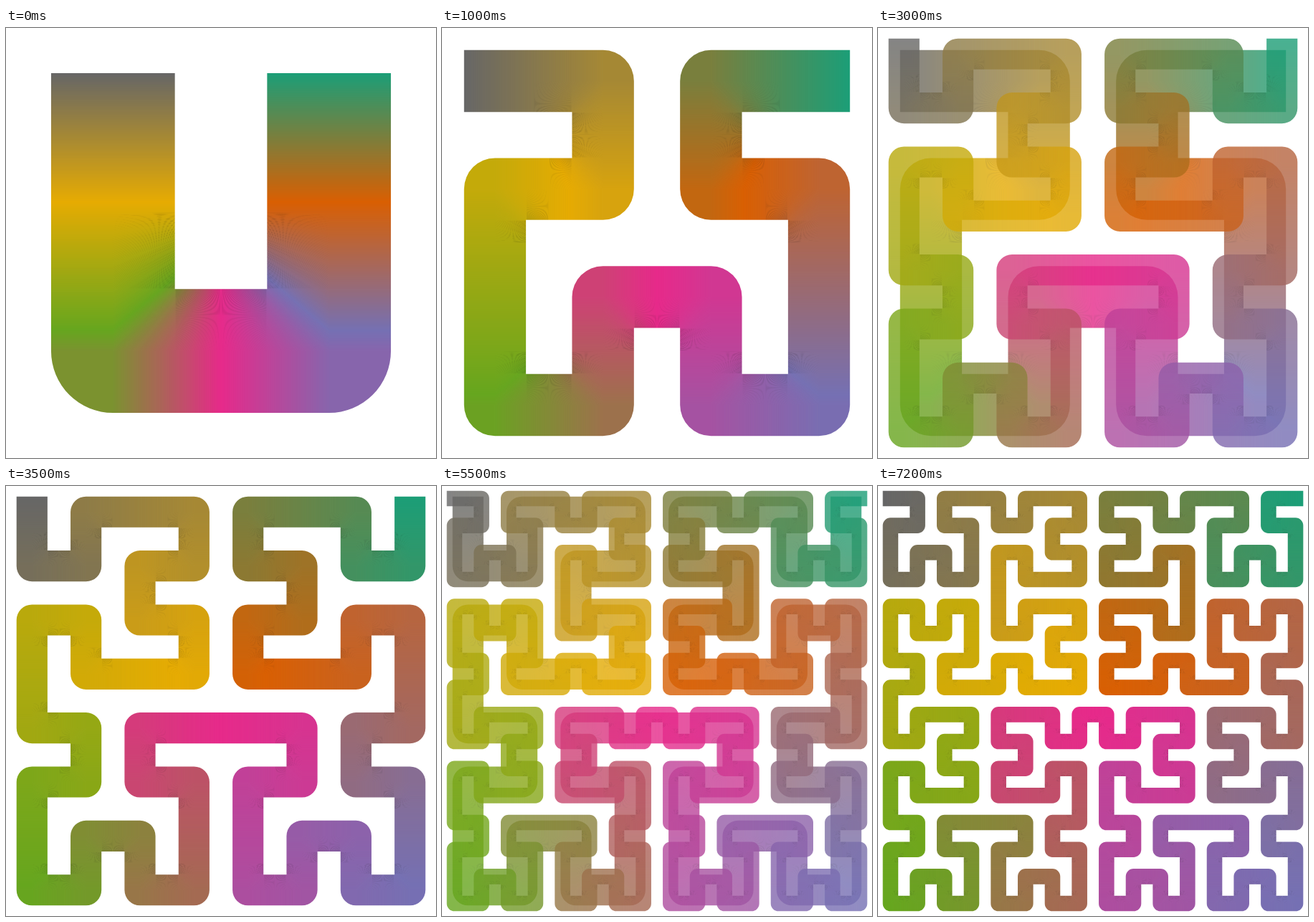
These frames come from a looping animation (600 by 600 pixels, 8000 ms). An HTML page with a canvas:

```html
<!DOCTYPE html>
<html lang="en">
<head>
<meta charset="utf-8">
<title>Hilbert curves</title>
<style>
  html, body { margin: 0; width: 100%; height: 100%; overflow: hidden; background: #fff; }
  canvas { display: block; width: 600px; height: 600px; }
</style>
</head>
<body>
<canvas id="stage" width="600" height="600"></canvas>
<script>
const SIZE = 600;
const SPAN = 602.8;      // side of the square the curve fills
const THICKNESS = 0.573; // line width relative to point spacing
const BLEND = 0.8;
const LOOP = 8000;
const STOPS = [
  [27, 158, 119], [217, 95, 2], [117, 112, 179], [231, 41, 138],
  [102, 166, 30], [230, 171, 2], [102, 102, 102]
];
// Start time and the curve orders visible from then on.
const STEPS = [
  [0, [1]], [500, [1, 2]], [1000, [2]], [3000, [2, 3]],
  [3500, [3]], [5500, [3, 4]], [6000, [4]]
];

function hilbert(x, y, ax, ay, bx, by, n, out = []) {
  if (n === 0) {
    out.push([x + (ax + bx) / 2, y + (ay + by) / 2]);
    return out;
  }
  const hax = ax / 2, hay = ay / 2, hbx = bx / 2, hby = by / 2;
  hilbert(x, y, hbx, hby, hax, hay, n - 1, out);
  hilbert(x + hax, y + hay, hax, hay, hbx, hby, n - 1, out);
  hilbert(x + hax + hbx, y + hay + hby, hax, hay, hbx, hby, n - 1, out);
  hilbert(x + hax + bx, y + hay + by, -hbx, -hby, -hax, -hay, n - 1, out);
  return out;
}

function colorAt(t) {
  const p = Math.min(Math.max(t, 0), 1) * (STOPS.length - 1);
  const i = Math.min(Math.floor(p), STOPS.length - 2);
  const rgb = STOPS[i].map((c, k) => Math.round(c + (STOPS[i + 1][k] - c) * (p - i)));
  return `rgb(${rgb})`;
}

function direction(a, b) {
  const dx = b[0] - a[0], dy = b[1] - a[1], len = Math.hypot(dx, dy);
  return { x: dx / len, y: dy / len, len };
}

function tracePolygon(ctx, pts) {
  ctx.beginPath();
  pts.forEach(([x, y]) => ctx.lineTo(x, y));
}

// Paints color bands from vertex v halfway along d; bands lean into the inner corner.
function paintHalf(ctx, v, d, n, turning, edge, colorOf) {
  const half = d.len / 2;
  const count = Math.ceil(half / 1.5);
  const row = u => {
    const inner = turning && u < half ? edge + u * (half - edge) / half : u;
    const at = (along, side) => [
      v[0] + d.x * along + n.x * side,
      v[1] + d.y * along + n.y * side
    ];
    return [at(u, -edge), at(u, 0), at(inner, edge)];
  };
  for (let i = 0; i < count; i++) {
    const from = half * i / count, to = half * (i + 1) / count;
    tracePolygon(ctx, [...row(from), ...row(to + 0.8).reverse()]);
    ctx.fillStyle = colorOf((from + to) / 2);
    ctx.fill();
  }
}

function makeCurve(order) {
  const canvas = document.createElement("canvas");
  canvas.width = canvas.height = SIZE;
  const ctx = canvas.getContext("2d");
  const low = (SIZE - SPAN) / 2;
  const pts = hilbert(low + SPAN, low, 0, SPAN, -SPAN, 0, order);
  const last = pts.length - 1;
  const width = SPAN / 2 ** order * THICKNESS;
  const edge = width / 2 + 1;

  // Lengthen both ends so the gradient also covers the square caps.
  for (const [end, next] of [[0, 1], [last, last - 1]]) {
    const d = direction(pts[next], pts[end]);
    pts[end] = [pts[end][0] + d.x * width / 2, pts[end][1] + d.y * width / 2];
  }

  const dist = [0];
  for (let i = 1; i <= last; i++) dist[i] = dist[i - 1] + direction(pts[i - 1], pts[i]).len;
  const shade = s => colorAt(s / dist[last]);

  ctx.lineWidth = width;
  ctx.lineJoin = "round";
  tracePolygon(ctx, pts);
  ctx.stroke();

  ctx.globalCompositeOperation = "source-atop";
  pts.forEach(([x, y], i) => {
    ctx.fillStyle = shade(dist[i]);
    ctx.fillRect(x - edge, y - edge, edge * 2, edge * 2);
  });
  pts.forEach((v, i) => {
    const back = i > 0 && direction(v, pts[i - 1]);
    const ahead = i < last && direction(v, pts[i + 1]);
    const turning = back && ahead && Math.abs(back.x * ahead.x + back.y * ahead.y) < 0.5;
    const normal = (d, other) => turning ? other : { x: -d.y, y: d.x };
    if (back) paintHalf(ctx, v, back, normal(back, ahead), turning, edge, u => shade(dist[i] - u));
    if (ahead) paintHalf(ctx, v, ahead, normal(ahead, back), turning, edge, u => shade(dist[i] + u));
  });
  return canvas;
}

const curves = [1, 2, 3, 4].map(makeCurve);
const stage = document.getElementById("stage").getContext("2d");
const start = performance.now();
let shown = null;

function draw() {
  const time = Math.max(0, performance.now() - start) % LOOP;
  const [, orders] = STEPS.filter(([from]) => from <= time).pop();
  if (orders !== shown) {
    shown = orders;
    stage.globalAlpha = 1;
    stage.fillStyle = "#fff";
    stage.fillRect(0, 0, SIZE, SIZE);
    stage.globalAlpha = orders.length > 1 ? BLEND : 1;
    orders.forEach(order => stage.drawImage(curves[order - 1], 0, 0));
  }
  requestAnimationFrame(draw);
}
draw();
</script>
</body>
</html>
```
